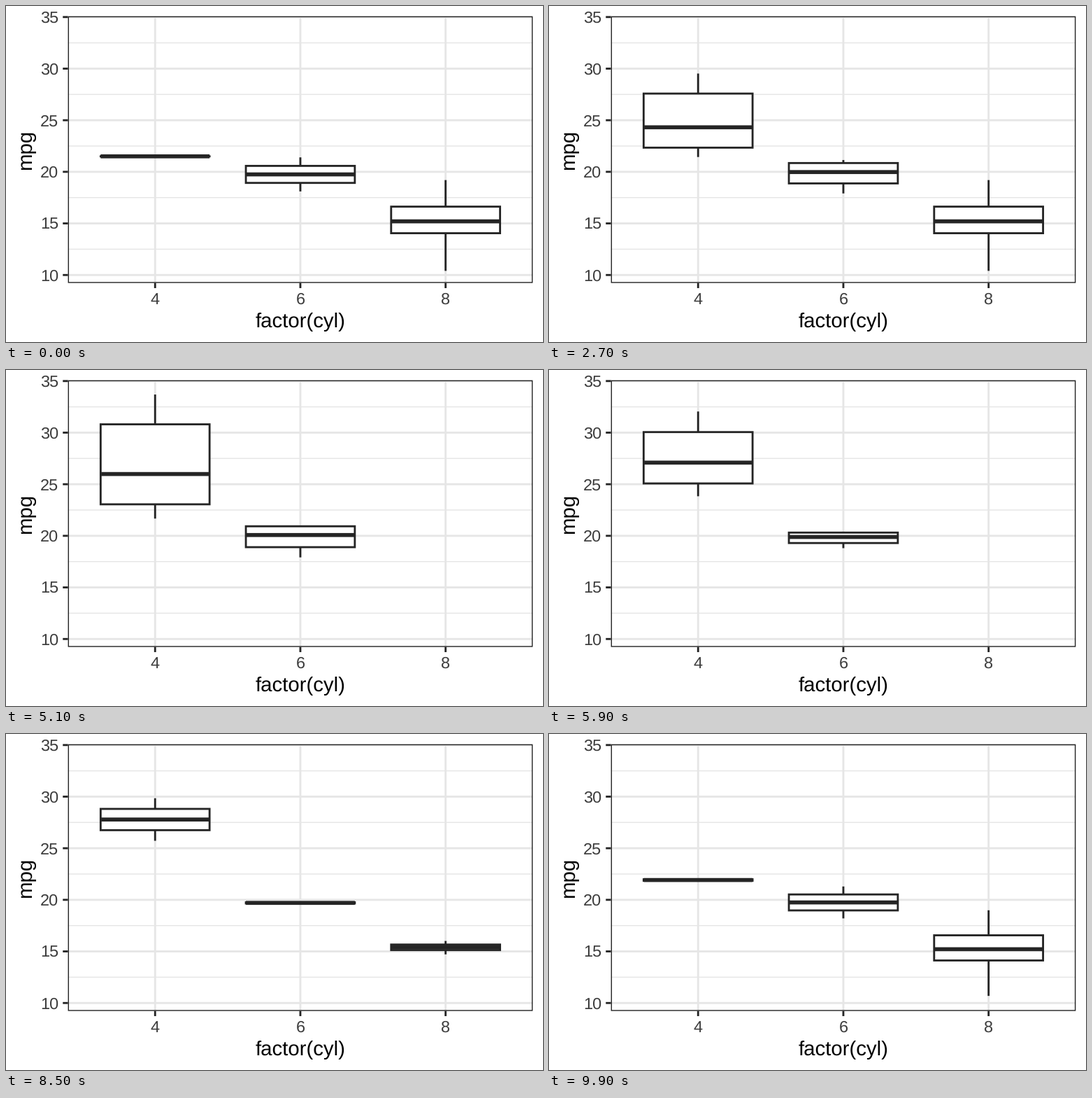
A matplotlib script that plays this animation: 768x480 px, repeating every 10 s.

```python
import matplotlib.pyplot as plt
from matplotlib.animation import FuncAnimation
from matplotlib.patches import Rectangle

W, H, DPI = 768, 480, 192
PX = 72 / DPI  # points per pixel

LEFT, RIGHT, TOP, BOTTOM = 88.6, 753.33, 14.67, 395.7
Y_MIN, Y_MAX = 9.225, 35.075
X_MIN, X_MAX = 0.4, 3.6
THIN, LINE, FAT = 1.42, 2.845, 5.69
DARK, GRID, LABEL = "#252525", "#e6e6e6", "#3d3d3d"

# (min, lower hinge, median, upper hinge, max) for each cylinder count
STATES = [
    [(21.5,) * 5, (18.1, 18.925, 19.75, 20.575, 21.4),
     (10.4, 14.05, 15.2, 16.625, 19.2)],
    [(21.4, 22.8, 25.85, 30.9, 33.9), (17.8, 18.85, 20.1, 21.0, 21.0), None],
    [(26.0, 27.1, 28.2, 29.3, 30.4), (19.7,) * 5,
     (15.0, 15.2, 15.4, 15.6, 15.8)],
]
# (first frame, last frame) of the move out of each state
MOVES = [(16, 33), (50, 67), (84, 100)]

plt.rcParams["font.family"] = "Liberation Sans"
plt.rcParams["text.hinting"] = "none"

fig = plt.figure(figsize=(W / DPI, H / DPI), dpi=DPI, facecolor="white")
ax = fig.add_axes([0, 0, 1, 1])
ax.set_xlim(0, W)
ax.set_ylim(H, 0)
ax.axis("off")


def px(x):
    return LEFT + (x - X_MIN) / (X_MAX - X_MIN) * (RIGHT - LEFT)


def py(y):
    return BOTTOM - (y - Y_MIN) / (Y_MAX - Y_MIN) * (BOTTOM - TOP)


def line(xs, ys, color, width, z):
    return ax.plot(xs, ys, color=color, lw=width * PX, zorder=z,
                   solid_capstyle="butt", snap=False)[0]


def frame_rect(x, y, w, h, width, fill, z):
    rect = Rectangle((x, y), w, h, facecolor=fill, edgecolor=DARK,
                     lw=width * PX, joinstyle="miter", zorder=z, snap=False)
    return ax.add_patch(rect)


def label(x, y, text, size, color, ha="center", **kw):
    ax.text(x, y, text, fontsize=size, color=color, ha=ha, va="baseline", **kw)


def draw_axes():
    for k in range(5):
        y = py(12.5 + 5 * k)
        line([LEFT, RIGHT], [y, y], GRID, THIN, 1)
    for value in range(10, 36, 5):
        y = py(value)
        line([LEFT, RIGHT], [y, y], GRID, LINE, 1)
        line([LEFT - 7.33, LEFT], [y, y], DARK, LINE, 1)
        label(75.2, y + 8.4, str(value), 8.8, LABEL, ha="right")
    for i, cyl in enumerate((4, 6, 8), 1):
        x = px(i)
        line([x, x], [TOP, BOTTOM], GRID, LINE, 1)
        line([x, x], [BOTTOM, BOTTOM + 7.33], DARK, LINE, 1)
        label(x, 425.8, str(cyl), 8.8, LABEL)
    inset = THIN / 2
    frame_rect(LEFT + inset, TOP + inset, RIGHT - LEFT - THIN,
               BOTTOM - TOP - THIN, THIN, "none", 9)
    label((LEFT + RIGHT) / 2, 459.4, "factor(cyl)", 11, "black")
    label(35.8, (TOP + BOTTOM) / 2, "mpg", 11, "black",
          rotation=90, rotation_mode="anchor")


class Box:
    def __init__(self, pos):
        x, x0, x1 = px(pos), px(pos - 0.375), px(pos + 0.375)
        self.low = line([x, x], [0, 0], DARK, LINE, 3)
        self.high = line([x, x], [0, 0], DARK, LINE, 3)
        self.body = frame_rect(x0, 0, x1 - x0, 1, LINE, "white", 4)
        self.mid = line([x0, x1], [0, 0], DARK, FAT, 5)
        self.parts = [self.low, self.high, self.body, self.mid]

    def show(self, stats):
        for part in self.parts:
            part.set_visible(stats is not None)
        if stats is None:
            return
        lo, q1, med, q3, hi = map(py, stats)
        self.low.set_ydata([q1, lo])
        self.high.set_ydata([q3, hi])
        self.body.set_y(q3)
        self.body.set_height(max(q1 - q3, 0.05))
        self.mid.set_ydata([med, med])


def blend(a, b, t):
    """Linear tween; boxes without a partner switch at the very end."""
    if t >= 1:
        return b
    if a is None or b is None:
        return a
    return [u + (v - u) * t for u, v in zip(a, b)]


def update(frame):
    state, t = 0, 0.0
    for k, (start, end) in enumerate(MOVES):
        if frame >= start:
            state, t = k, min((frame - start) / (end - start), 1)
    target = STATES[(state + 1) % len(STATES)]
    for box, a, b in zip(boxes, STATES[state], target):
        box.show(blend(a, b, t))
    return [part for box in boxes for part in box.parts]


draw_axes()
boxes = [Box(pos) for pos in (1, 2, 3)]
anim = FuncAnimation(fig, update, frames=100, interval=100,
                     repeat=True, repeat_delay=0, blit=False)
plt.show()
```
